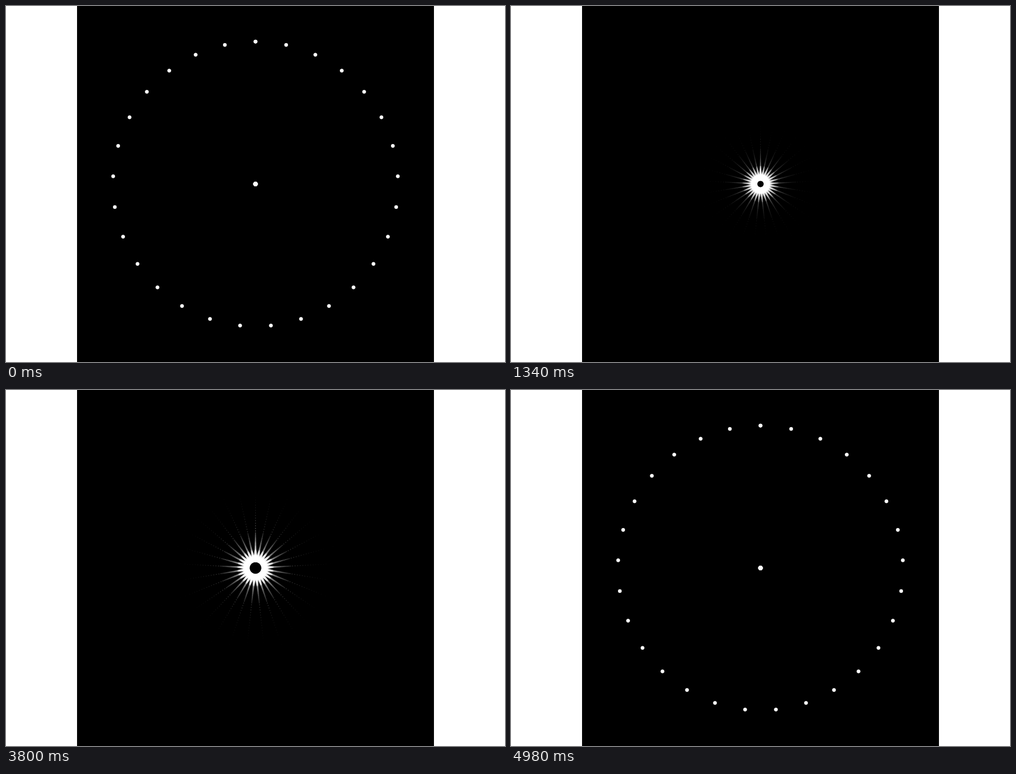
An HTML page with a canvas that plays this animation: 885 px wide and 632 px high, repeating every 5 s.

```html
<!DOCTYPE html>
<html lang="en">
<head>
<meta charset="utf-8">
<title>Halving circle</title>
<style>
  html, body { margin: 0; width: 100%; height: 100%; overflow: hidden; background: #fff; }
  canvas { display: block; }
</style>
</head>
<body>
<canvas id="stage" width="885" height="632"></canvas>
<script>
const ctx = document.getElementById('stage').getContext('2d');

const STEP_MS = 20;
const STEPS = 125;           // inward run; the loop then plays it backwards
const HALVINGS = 9;
const WAKE = 62;             // trail length in steps
const RAYS = 29;             // the first and last point share the top place
const CX = 442.5, CY = 316, RADIUS = 252.8;
const DOT = 7.11, BORDER = 0.945;

// The radius halves again and again, at constant speed within each halving.
function radiusAt(step) {
  const pos = step * HALVINGS / (STEPS - 1);
  const whole = Math.floor(pos);
  return RADIUS * 2 ** -whole * (1 - (pos - whole) / 2);
}

// Fill and border are both translucent, so old dots look like small rings.
function drawRing(radius, strength) {
  const dotRadius = Math.max(0.5, 0.375 * (DOT * strength + BORDER));
  ctx.globalAlpha = strength;
  for (let i = 0; i <= RAYS; i++) {
    const angle = i * 2 * Math.PI / RAYS;
    ctx.beginPath();
    ctx.arc(CX + radius * Math.sin(angle), CY - radius * Math.cos(angle),
            dotRadius, 0, 2 * Math.PI);
    ctx.fill();
    ctx.stroke();
  }
}

function draw(step) {
  ctx.globalAlpha = 1;
  ctx.fillStyle = '#fff';
  ctx.fillRect(0, 0, 885, 632);
  ctx.fillStyle = '#000';
  ctx.fillRect(126, 0, 633, 632);

  ctx.fillStyle = ctx.strokeStyle = '#fff';
  ctx.lineWidth = BORDER * 0.75;
  for (let age = WAKE; age >= 1; age--) {
    const past = (step - age + STEPS) % STEPS;
    drawRing(radiusAt(past), ((WAKE + 1 - age) / WAKE) ** 3);
  }
  drawRing(radiusAt(step), 1);
}

const start = performance.now();
let shown = -1;

function tick() {
  const index = Math.floor((performance.now() - start) / STEP_MS) % (2 * STEPS);
  const step = index < STEPS ? index : 2 * STEPS - 1 - index;
  if (step !== shown) {
    draw(step);
    shown = step;
  }
  requestAnimationFrame(tick);
}
tick();
</script>
</body>
</html>
```
